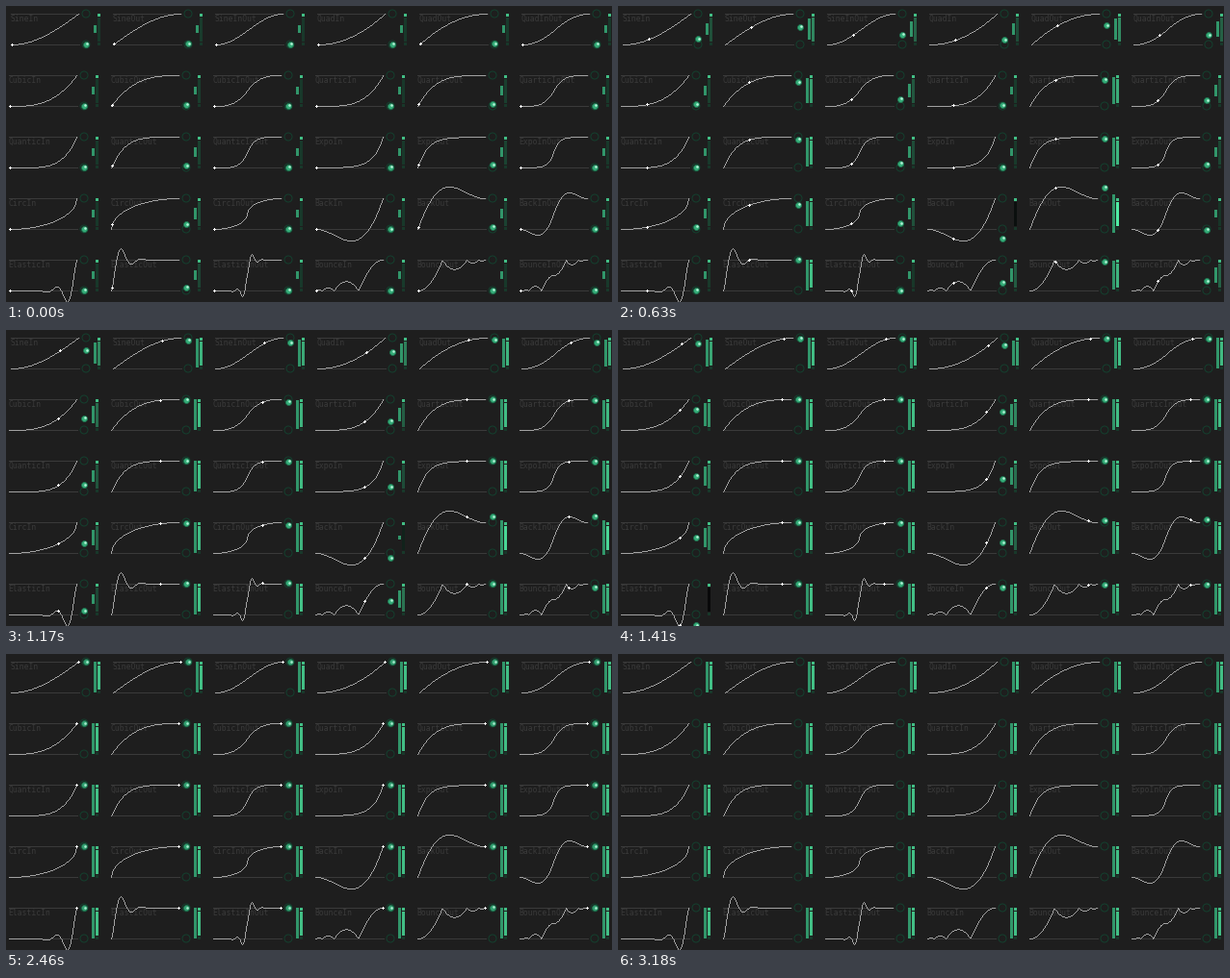
A matplotlib script that plays this animation: 629 by 308 pixels, repeating every 3.21 s.

```python
import numpy as np
import matplotlib.pyplot as plt
from matplotlib.animation import FuncAnimation
from matplotlib.collections import PolyCollection

W, H, DPI = 629, 308, 64
PT = 72 / DPI  # points per pixel
STEP, FRAMES = 30, 107
SPAN, RISE = 70, 32

START = np.array([24, 56, 42]) / 255
END = np.array([66, 190, 133]) / 255
BAR = "#31966a"
RING = "#14402e"
RULE = "#3a3a3a"
CURVE = "#a2a2a2"
LABEL = "#3a3a3a"


def bounce_out(t):
    if t < 4 / 11:
        return 121 * t * t / 16
    if t < 8 / 11:
        return 363 / 40 * t * t - 9.9 * t + 3.4
    if t < 0.9:
        return 4356 / 361 * t * t - 35442 / 1805 * t + 16061 / 1805
    return 10.8 * t * t - 20.52 * t + 10.72


EASES = {
    "Sine": lambda t: 1 - np.cos(t * np.pi / 2),
    "Quad": lambda t: t ** 2,
    "Cubic": lambda t: t ** 3,
    "Quartic": lambda t: t ** 4,
    "Quantic": lambda t: t ** 5,
    "Expo": lambda t: 2 ** (10 * (t - 1)) if t > 0 else 0,
    "Circ": lambda t: 1 - np.sqrt(max(0, 1 - t * t)),
    "Back": lambda t: t ** 3 - t * np.sin(t * np.pi),
    "Elastic": lambda t: np.sin(6.5 * np.pi * t) * 2 ** (10 * (t - 1)),
    "Bounce": lambda t: 1 - bounce_out(1 - t),
}


def ease_out(f):
    return lambda t: 1 - f(1 - t)


def ease_in_out(f):
    return lambda t: f(2 * t) / 2 if t < 0.5 else 1 - f(2 - 2 * t) / 2


names, funcs = [], []
for name, f in EASES.items():
    names += [name + "In", name + "Out", name + "InOut"]
    funcs += [f, ease_out(f), ease_in_out(f)]

cell = np.arange(len(funcs))
row, col = cell // 6, cell % 6
left = 3 + 106 * col + 2 * (row == 0)
top = 8 + 64 * row


def rects(x, y, w, h):
    """Rectangles from arrays of left, top, width and height."""
    x, y, w, h = np.broadcast_arrays(x, y, w, h)
    return np.stack([np.stack([x, y], -1), np.stack([x + w, y], -1),
                     np.stack([x + w, y + h], -1), np.stack([x, y + h], -1)], 1)


def nearest(a):
    return np.floor(np.asarray(a) + 0.5)


def pixel_line(xs, ys):
    """Whole pixels of a one-pixel polyline without smoothing."""
    pts = nearest(np.column_stack([xs, ys]))
    steps = []
    for a, b in zip(pts[:-1], pts[1:]):
        n = int(max(abs(b - a).max(), 1))
        steps.append(nearest(a + (b - a) * np.linspace(0, 1, n + 1)[:, None]))
    return np.unique(np.vstack(steps), axis=0)


def crosses(x, y):
    return np.concatenate([rects(x - 1, y, 3, 1), rects(x, y - 1, 1, 3)])


fig = plt.figure(figsize=(W / DPI, H / DPI), dpi=DPI, facecolor="#1e1e1e")
ax = fig.add_axes([0, 0, 1, 1])
ax.set(xlim=(0, W), ylim=(H, 0))
ax.axis("off")


def blocks(verts, color, z):
    return ax.add_collection(PolyCollection(verts, fc=color, lw=0, zorder=z))


# Fixed parts
for dy in (0, RISE):
    blocks(rects(left, top + dy, SPAN + 2, 1), RULE, 1)
for x, y, name in zip(left, top, names):
    ax.text(x - 0.5, y + 8, name, family="DejaVu Sans Mono", size=8 * PT,
            color=LABEL, va="baseline", zorder=2)

ts = np.linspace(0, 1, SPAN + 1)
curves = np.vstack([
    pixel_line(x + SPAN * ts, y + RISE - RISE * np.array([f(t) for t in ts]))
    for x, y, f in zip(left, top, funcs)])
blocks(rects(curves[:, 0], curves[:, 1], 1, 1), CURVE, 3)

ring_x = left + 78
ax.scatter(np.tile(ring_x, 2), np.r_[top, top + RISE],
           s=(8 * PT) ** 2, fc="none", ec=RING, lw=PT, zorder=4)
blocks(rects(left + 90, top, 3, 3), END, 4)
blocks(rects(left + 90, top + 30, 3, 3), START, 4)

# Moving parts
meters = blocks(rects(left + 86, top, 3, RISE), BAR, 4)
lamps = blocks(rects(left + 90, top + 4, 3, 25), START, 4)
balls = ax.scatter(ring_x, top, s=(6 * PT) ** 2, fc="#35ad79", ec="#1f7450",
                   lw=0.8 * PT, zorder=5)
glints = ax.scatter(ring_x, top, s=(2.6 * PT) ** 2, fc="#b4f4d8", lw=0, zorder=6)
dots = blocks(crosses(left, top), "white", 7)


def progress(frame):
    return np.interp(frame, [0, 10, 21, 39, 54], [0.012, 0.2, 0.387, 0.729, 1])


def opacity(ms):
    """Fade out in eleven even steps."""
    if ms < 2460:
        return 1
    return max(0, 1 - (np.floor((ms - 2460) / 72 + 0.49) + 1) / 11)


def draw(frame):
    t = progress(frame)
    v = np.array([f(t) for f in funcs])
    y = top + RISE - RISE * v

    h = np.maximum(8 + 24 * v, 0.5)
    meters.set_verts(rects(left + 86, top + RISE / 2 - h / 2, 3, h))
    lamps.set_facecolor(np.clip(START + (END - START) * v[:, None], 0, 1))

    balls.set_offsets(np.column_stack([ring_x, y]))
    glints.set_offsets(np.column_stack([ring_x + 0.5, y - 0.5]))
    dots.set_verts(crosses(nearest(left + SPAN * t), nearest(y)))
    alpha = opacity(frame * STEP)
    for part in (balls, glints, dots):
        part.set_alpha(alpha)
    return meters, lamps, balls, glints, dots


anim = FuncAnimation(fig, draw, frames=FRAMES, interval=STEP, repeat=True,
                     repeat_delay=0, blit=False)
plt.show()
```
